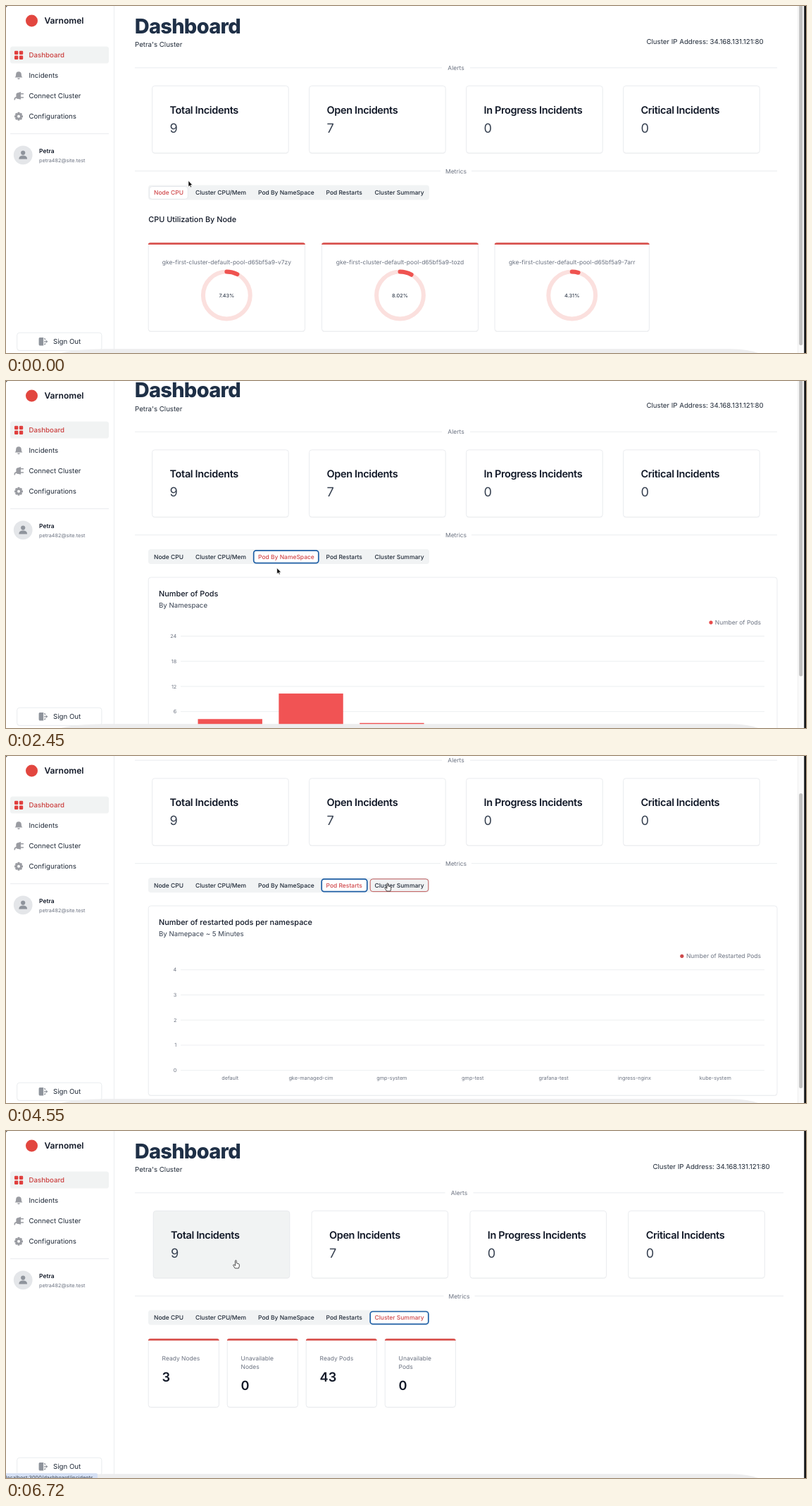
These frames come from a looping animation (1136 by 493 pixels, 8.47 s). An HTML page:

```html
<!DOCTYPE html>
<html lang="en">
<head>
<meta charset="utf-8">
<title>Cluster dashboard</title>
<style>
html, body { margin: 0; width: 100%; height: 100%; overflow: hidden; background: #fff; }
svg { display: block; width: 100%; height: 100%; }
text { font-family: Inter, "Liberation Sans", sans-serif; font-optical-sizing: none; text-rendering: geometricPrecision; white-space: pre; }
</style>
</head>
<body>
<svg id="stage" viewBox="0 0 1136 493" xmlns="http://www.w3.org/2000/svg"></svg>
<script>
const LOOP = 8470, STEP = 70, SCROLL = 81.7;
const INK = '#1f2937', GREY = '#6b7280', LINE = '#e5e7eb', RED = '#d0474a', BRIGHT = '#ef5350';
const BODY = 9.68, SMALL = 8.47, TINY = 7.26;

// ---- drawing helpers
const text = (x, y, str, size = BODY, fill = INK, weight = 400, extra = '') =>
  `<text x="${x}" y="${y}" font-size="${size}" fill="${fill}" font-weight="${weight}" ${extra}>${str}</text>`;
const mid = 'text-anchor="middle"', end = 'text-anchor="end"';
const rect = (x, y, w, h, r, fill, extra = '') =>
  `<rect x="${x}" y="${y}" width="${w}" height="${h}" rx="${r}" fill="${fill}" ${extra}/>`;
const hline = (x1, x2, y, color = LINE) =>
  `<path d="M${x1} ${y}H${x2}" stroke="${color}" stroke-width=".8"/>`;
const group = (id, body, extra = '') => `<g id="${id}" ${extra}>${body}</g>`;
const box = (x, y, w, h, extra = '') =>
  rect(x, y + .8, w, h, 3.6, '#000', 'opacity=".05"') +
  rect(x, y, w, h, 3.6, '#fff', `stroke="${LINE}" stroke-width=".8" ${extra}`);
const redTopBox = (x, y, w, h) => box(x, y, w, h) +
  `<path d="M${x - .3} ${y + 2.4}q0 -2.8 3 -2.8h${w - 5.4}q3 0 3 2.8z" fill="#d9534f"/>`;

function ring(x, y, pct) {
  const circle = (color, extra) =>
    `<circle cx="${x}" cy="${y}" r="33.4" fill="none" stroke="${color}" stroke-width="6" ${extra}/>`;
  return circle('#fbe0de', '') +
    circle(BRIGHT, `pathLength="100" stroke-dasharray="${pct} 100" stroke-linecap="round" transform="rotate(-90 ${x} ${y})"`) +
    text(x, y + 2.6, pct.toFixed(2) + '%', TINY, '#374151', 500, mid);
}

// ---- sidebar
function sidebar() {
  const icon = '#9a9ca2';
  const tiles = [[12, 63.7], [18.9, 63.7], [12, 70.6], [18.9, 70.6]]
    .map(([x, y]) => rect(x, y, 5.3, 5.3, 1.2, '#e0403f')).join('');
  const teeth = [0, 45, 90, 135]
    .map(a => rect(16.4, 150.8, 3.2, 12, 1, icon, `transform="rotate(${a} 18 156.8)"`)).join('');
  return `<path d="M153.5 0V493" stroke="#ebedef" stroke-width="1"/>
    <circle cx="36.5" cy="21" r="8.5" fill="#e2463f"/>` +
    text(54.5, 25.3, 'Varnomel', 12.1, '#111827', 600) +
    rect(6, 57.5, 140, 24, 3.6, '#f1f3f3') + tiles +
    text(32.5, 73.1, 'Dashboard', BODY, '#cb3f3e', 500) +
    text(32.5, 102.1, 'Incidents') + text(32.5, 131.2, 'Connect Cluster') + text(32.5, 160.2, 'Configurations') +
    `<path d="M12.6 101.6q1.6-1.4 1.6-4.6a3.8 3.8 0 0 1 7.6 0q0 3.2 1.6 4.6zM16.2 102.4h3.6a1.8 1.8 0 0 1-3.6 0z" fill="${icon}"/>
    <path d="M11.4 133.5q0-4 3-4.4V126q0-2.6 2.8-2.8l3.8-1.2v2h4v1.6h-4v3.6h4v1.6h-4v2l-3.8-.8q-2 0-2.6-1.2-1.6.2-1.6 2.7z" fill="${icon}"/>` +
    teeth + `<circle cx="18" cy="156.8" r="4.6" fill="${icon}"/><circle cx="18" cy="156.8" r="2" fill="#fff"/>` +
    hline(6, 146, 181.5) +
    `<circle cx="24.2" cy="211.8" r="13.4" fill="#e4e6e9"/>
    <circle cx="24.2" cy="208.6" r="3.1" fill="#8f949c"/>
    <path d="M18.3 217.6q0-5 5.9-5t5.9 5z" fill="#8f949c"/>` +
    text(47, 209, 'Petra', SMALL, '#111827', 600) + text(47, 221.6, 'petra482@site.test', TINY, GREY) +
    box(15.7, 464.2, 120.2, 25.2) +
    `<path d="M46.6 472.2l1-1.2h5.6v11.4h-5.6l-1-1.2zM54 472.2h2v2.2h-1v-1.2h-1zM54 481.2h2V479h-1v1.2h-1zM54 476.2h2.8v-1.6l2.6 2.2-2.6 2.2v-1.6H54z" fill="#8f949c"/>` +
    text(67, 480, 'Sign Out');
}

// ---- page head; u is 1 when the scrollbar is gone and the page is wider
const cardX = (u, i) => 207.6 + 1.6 * u + i * (223 + 1.85 * u);
const CARD_W = 193.6;

function head(u) {
  const right = 1095 + 9 * u, c = (183 + right) / 2;
  const divider = (y, label, half) =>
    hline(183, c - half, y - .2) + hline(c + half, right, y - .2) + text(c, y + 3.1, label, SMALL, GREY, 400, mid);
  const cards = [['Total Incidents', 9], ['Open Incidents', 7], ['In Progress Incidents', 0], ['Critical Incidents', 0]]
    .map(([name, n], i) => {
      const x = cardX(u, i);
      return box(x, 113.5, CARD_W, 95.4, `id="card${u}${i}"`) +
        text(x + 24.9, 153, name, 14.5, '#111827', 600, 'letter-spacing="-.36"') +
        text(x + 24.9, 179.8, n, 18.2, '#374151');
    }).join('');
  return text(182.7, 38.8, 'Dashboard', 29, '#1f3047', 800, 'letter-spacing="-.72"') +
    text(183, 58.4, "Petra's Cluster") +
    text(right - 19.5, 53.5, 'Cluster IP Address: 34.168.131.121:80', BODY, INK, 400, end) +
    divider(88, 'Alerts', 20) + divider(234.6, 'Metrics', 22) + cards;
}

// ---- tabs: label, left and right edge of the text
const TABS = [['Node CPU', 210, 252], ['Cluster CPU/Mem', 269, 341], ['Pod By NameSpace', 358, 437.5],
  ['Pod Restarts', 454.5, 506.5], ['Cluster Summary', 523.5, 593.5]];

const tabs = () => rect(202, 254.6, 399, 21, 4, '#f1f3f4') +
  TABS.map(([name, a, b], i) => rect(a - 6.3, 256.5, b - a + 12.6, 17.8, 3.6, 'none', `id="tab${i}"`) +
    text(a, 268.4, name, SMALL, INK, 500, `id="label${i}"`)).join('');

// ---- panels
const ZERO = 521, GRID = 35.72, SLOT = 114.85;
const PODS = [['gmp-system', 9], ['kube-system', 22], ['default', 7], ['gmp-test', 2],
  ['grafana-test', 1], ['ingress-nginx', 1], ['gke-managed-cim', 1]];

function chart(title, sub, legend, dotX, dot, unit, names, dy) {
  let s = box(202.2, 294.6, 892.8, 262 + dy) +
    text(217, 322, title, 10.9, '#111827', 500) + text(217, 337.4, sub, BODY, '#374151') +
    `<circle cx="${dotX}" cy="${358.7 + dy}" r="2.6" fill="${dot}"/>` +
    text(1072, 361.8 + dy, legend, SMALL, GREY, 400, end);
  for (let i = 0; i < 5; i++) {
    const y = ZERO + dy - i * GRID;
    s += hline(248, 1077, y, '#e9ebee') + text(242.3, y + 2.6, i * unit, TINY, GREY, 400, end);
  }
  return s + names.map((n, i) => text(318.2 + i * SLOT, 534.6 + dy, n, TINY, GREY, 400, mid)).join('');
}

const panels = [
  text(202.2, 307.3, 'CPU Utilization By Node', 10.9, '#111827', 500) +
    [[202.2, 222.3, 'v7zy', 7.43], [448.5, 222, 'tozd', 8.02], [694, 219.4, '7arr', 4.31]].map(([x, w, id, pct]) =>
      redTopBox(x, 336.6, w, 125.6) +
      text(x + w / 2, 367, 'gke-first-cluster-default-pool-d65bf5a9-' + id, SMALL, GREY, 400, mid) +
      ring(x + w / 2, 411, pct)).join(''),

  redTopBox(202.2, 297.6, 232.7, 148) +
    [[271.2, 'Memory', 56.52], [373, 'CPU', 4.72]].map(([x, what, pct]) =>
      text(x, 333.1, 'Cluster ' + what, SMALL, GREY, 400, mid) + text(x, 345.2, 'Usage', SMALL, GREY, 400, mid) +
      ring(x, 394, pct)).join(''),

  chart('Number of Pods', 'By Namespace', 'Number of Pods', 1001, '#e84c4c', 6, PODS.map(p => p[0]), 0) +
    PODS.map((p, i) => rect(272.5 + i * SLOT, ZERO, 91.4, 0, 0, '#f15354', `id="bar${i}"`)).join(''),

  chart('Number of restarted pods per namespace', 'By Namepace ~ 5 Minutes', 'Number of Restarted Pods', 959.8, '#cd4a4c', 1,
    ['default', 'gke-managed-cim', 'gmp-system', 'gmp-test', 'grafana-test', 'ingress-nginx', 'kube-system'], 7.3),

  [['Ready', 'Nodes', 3], ['Unavailable', 'Nodes', 0], ['Ready', 'Pods', 43], ['Unavailable', 'Pods', 0]].map(([a, b, n], i) => {
    const x = 202.2 + i * 112, two = i % 2;
    return redTopBox(x, 295.4, 100.2, 97) +
      text(x + 19.4, 326, two ? a : a + ' ' + b, SMALL, GREY) +
      (two ? text(x + 19.4, 338.1, b, SMALL, GREY) : '') +
      text(x + 19.4, two ? 368.4 : 356.3, n, 18.2, '#111827', 600);
  }).join('')
];

document.getElementById('stage').innerHTML =
  rect(0, 0, 1136, 493, 0, '#fff') +
  group('page', group('head0', head(0)) + group('head1', head(1)) + tabs() +
    panels.map((p, i) => group('panel' + i, p)).join('')) +
  sidebar() +
  group('bar', rect(1124.5, 0, 9, 493, 0, '#fafafa') + '<path d="M1124.5 0V493" stroke="#ebebeb" stroke-width=".8"/>' +
    rect(1126.2, 0, 5, 0, 2.5, '#c1c1c1', 'id="thumb"')) +
  '<path d="M78 493Q100 487.4 140 487.2H1030Q1055 487.6 1068 493Z" fill="#ededee"/>' +
  rect(1133.3, 0, 3, 493, 0, '#131517') + '<path d="M0 0H2L0 2Z" fill="#555"/>' +
  group('status', rect(-4, 486.3, 134, 12, 2, '#d5e0f4') + text(-.5, 495, 'localhost:3000/dashboard/incidents', TINY, '#39424f')) +
  group('cursor',
    '<path id="arrow" d="M0 0V8.4L1.9 6.7 3.1 9.4 4.4 8.8 3.2 6.2H5.8Z" fill="#000" stroke="#fff" stroke-width=".6"/>' +
    '<path id="hand" d="M-.9 .9C-.9-.5 .9-.5 .9 .9V4L3.9 4.8C4.6 5 4.9 5.5 4.9 6.3V8.3L4 11.2H-1.2L-3.6 7.4C-4.2 6.2-3 5.6-2.2 6.4L-.9 7.6Z" fill="#fff" stroke="#222" stroke-width=".8"/>');

// ---- timeline
const CLICKS = [-STEP, 770, 1960, 3850, 4690];
const MOVES = [[0, 259, 248.3], [210, 259, 248.3], [350, 266, 258], [490, 275, 274], [630, 282, 270], [1330, 282, 270],
  [1750, 384.8, 265.4], [3000, 384.8, 265.8], [3430, 466, 201.4], [3570, 481, 184], [3700, 490, 180.5], [4060, 490, 180.5],
  [4340, 541.8, 180.8], [4850, 541.8, 180.8], [5320, 534, 242], [5670, 531.4, 250.6], [5880, 531.4, 250.6],
  [5950, 531.3, 250.3], [6090, 480, 260], [6230, 385, 247], [6370, 332, 190], [6440, 326.4, 183.8], [LOOP, 326.4, 183.8]];

const clamp = v => Math.max(0, Math.min(1, v));
const smooth = v => (v = clamp(v), v * v * (3 - 2 * v));

// cubic-bezier(.25, .1, .25, 1)
function ease(x) {
  let lo = 0, hi = 1, u = .5;
  for (let i = 0; i < 20; i++, u = (lo + hi) / 2) {
    if (.75 * u * (1 - u) + u ** 3 < x) lo = u; else hi = u;
  }
  return .3 * u * (1 - u) ** 2 + 3 * u * u * (1 - u) + u ** 3;
}

// Hermite curve through MOVES, at rest at turning points and holds
function slope(i, k) {
  const a = MOVES[i - 1], b = MOVES[i], c = MOVES[i + 1];
  return !a || !c || (b[k] - a[k]) * (c[k] - b[k]) <= 0 ? 0 : (c[k] - a[k]) / (c[0] - a[0]);
}
function pointer(t) {
  const i = Math.max(1, MOVES.findIndex(m => m[0] > t)), a = MOVES[i - 1], b = MOVES[i];
  const d = b[0] - a[0], s = (t - a[0]) / d, h = smooth(s);
  return [1, 2].map(k => a[k] + (b[k] - a[k]) * h +
    d * s * (1 - s) * ((1 - s) * slope(i - 1, k) - s * slope(i, k)));
}

const $ = Object.fromEntries([...document.querySelectorAll('[id]')].map(e => [e.id, e]));
const set = (e, attrs) => { for (const k in attrs) e.setAttribute(k, attrs[k]); };
const show = (e, on) => { e.style.display = on ? '' : 'none'; };
const latest = t => CLICKS.filter(c => c <= t).length - 1;

function draw(t) {
  const active = latest(t), panel = latest(t - STEP);
  const wide = panel === 1 || panel === 4 ? 1 : 0;
  const scroll = panel === 2 || panel === 3 ? SCROLL * smooth((t - 2310) / 500) : 0;
  const [x, y] = pointer(t), py = y + scroll;

  set($.page, { transform: `translate(0 ${-scroll})` });
  [0, 1].forEach(u => show($['head' + u], u === wide));
  panels.forEach((_, i) => show($['panel' + i], i === panel));

  let over = false;
  for (let i = 0; i < 4; i++) {
    const cx = cardX(wide, i), hit = x > cx && x < cx + CARD_W && py > 113.5 && py < 209;
    over = over || hit;
    set($[`card${wide}${i}`], { fill: hit ? '#f1f3f3' : '#fff' });
  }
  TABS.forEach(([, a, b], i) => {
    const hit = x > a - 7 && x < b + 7 && py > 256 && py < 275, on = i === active, focus = on && i > 0;
    over = over || hit;
    set($['tab' + i], {
      fill: on ? '#fff' : 'none',
      stroke: focus ? '#1f5fa5' : on ? LINE : hit ? '#bd4a4a' : 'none',
      'stroke-width': focus ? 1.7 : .9
    });
    set($['label' + i], { fill: on ? RED : INK });
  });

  const grow = ease(clamp((t - 2200) / 900));
  PODS.forEach(([, n], i) => {
    const h = n * GRID / 6 * grow;
    set($['bar' + i], { y: ZERO - h, height: h });
  });

  show($.bar, !wide);
  const top = panel === 3 ? 53 : -16 + .857 * scroll;
  set($.thumb, { y: top, height: [498, 0, 422, 419, 0][panel] });

  const first = Math.min(clamp((t - 4830) / 210), clamp((5670 - t) / 350));
  set($.status, { opacity: Math.max(first, clamp((t - 6510) / 210)) });

  set($.cursor, { transform: `translate(${x} ${y})` });
  show($.hand, over);
  show($.arrow, !over);
}

const start = performance.now();
function tick() {
  const t = (performance.now() - start) % LOOP;
  draw(Math.floor(t / STEP) * STEP);
  requestAnimationFrame(tick);
}
tick();
</script>
</body>
</html>
```
